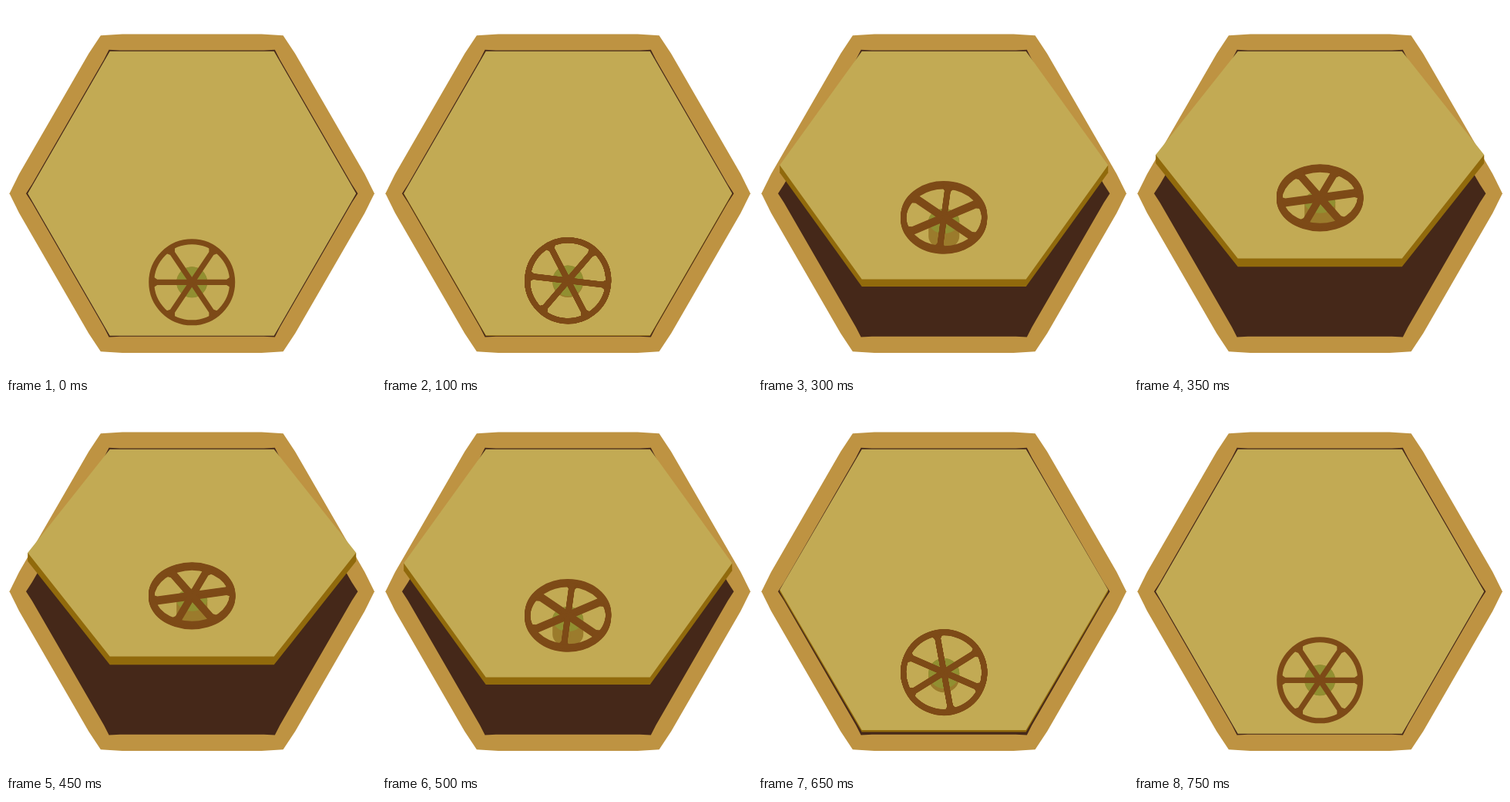
Recreate the animation shown at these times as an HTML page with a canvas. Size 480x480 px, loop 800 ms.

```html
<!DOCTYPE html>
<html lang="en">
<head>
<meta charset="utf-8">
<title>Hatch</title>
<style>
html, body { margin: 0; width: 100%; height: 100%; overflow: hidden; background: #fff; }
canvas { display: block; }
</style>
</head>
<body>
<canvas id="stage" width="480" height="480"></canvas>
<script>
const ctx = document.getElementById('stage').getContext('2d');
const RAD = Math.PI / 180;
const LOOP = 800, STEP = 50;
const OPEN = 45.8 * RAD, SPIN = 120 * RAD;
const LID_DEPTH = 16, HUB_HEIGHT = 33, WHEEL_HEIGHT = 41;
const CX = 241.2, CY = 243.2;
const COLOR = {
  frame: '#be9342', hole: '#452819', lid: '#c2aa54', edge: '#916a0c',
  hub: '#918f31', hubSide: '#9b7b2c', wheel: '#7d4a17'
};

// Repeats the points of one corner (the right one) around the hexagon.
function hexagon(corner) {
  const points = [];
  for (let k = 0; k < 6; k++) {
    const c = Math.cos(k * 60 * RAD), s = Math.sin(k * 60 * RAD);
    for (const [x, y] of corner) points.push([CX + x * c - y * s, CY + x * s + y * c]);
  }
  return points;
}

const rim = hexagon([[224.2, -25.2], [236.7, 0], [224.2, 25.2]]);
const hole = hexagon([[207.4, -12], [215.2, 0], [207.4, 12]]);
const lid = hexagon([[213, 0]]);
const HINGE = CY - 213 * Math.sin(60 * RAD);

function fillPath(points, color) {
  ctx.beginPath();
  points.forEach(([x, y]) => ctx.lineTo(x, y));
  ctx.closePath();
  ctx.fillStyle = color;
  ctx.fill();
}

function drawLid(cos, sin) {
  const face = lid.map(([x, y]) => [x, HINGE + (y - HINGE) * cos]);
  const drop = LID_DEPTH * sin;
  if (drop > 0) {
    const [right, lowRight, lowLeft, left] = face;
    const low = ([x, y]) => [x, y + drop];
    fillPath([left, right, low(right), low(lowRight), low(lowLeft), low(left)], COLOR.edge);
  }
  fillPath(face, COLOR.lid);
}

function drawHub(y, cos, sin) {
  const r = 20, top = y - HUB_HEIGHT * sin;
  ctx.fillStyle = COLOR.hubSide;
  ctx.beginPath();
  ctx.ellipse(CX, y, r, r * cos, 0, 0, Math.PI);
  ctx.ellipse(CX, top, r, r * cos, 0, Math.PI, 2 * Math.PI);
  ctx.fill();
  ctx.fillStyle = COLOR.hub;
  ctx.beginPath();
  ctx.ellipse(CX, top, r, r * cos, 0, 0, 2 * Math.PI);
  ctx.fill();
}

function drawWheelLayer(y, cos, turn) {
  ctx.save();
  ctx.translate(CX, y);
  ctx.scale(1, cos);
  ctx.rotate(turn);
  ctx.lineWidth = 7;
  ctx.beginPath();
  ctx.arc(0, 0, 52.5, 0, 2 * Math.PI);
  ctx.stroke();
  for (const angle of [0, 56, 124, 180, 236, 304]) {
    ctx.save();
    ctx.rotate(angle * RAD);
    // Spoke, flared where it meets the ring.
    fillPath([[0, -3.6], [45, -3.6], [50, -7], [50, 7], [45, 3.6], [0, 3.6]], COLOR.wheel);
    ctx.restore();
  }
  ctx.restore();
}

function drawWheel(y, cos, sin, turn) {
  ctx.strokeStyle = COLOR.wheel;
  const half = sin > 0 ? 4 : 0;
  for (let z = -half; z <= half; z++) {
    drawWheelLayer(y - (WHEEL_HEIGHT + z) * sin, cos, turn);
  }
}

function draw(time) {
  const step = Math.floor((time % LOOP) / STEP);
  const u = Math.max(0, step - 1) / 14;
  const x = 1 - Math.abs(2 * u - 1);
  const ease = x * x * (3 - 2 * x);
  const cos = Math.cos(OPEN * ease), sin = Math.sin(OPEN * ease);
  const center = HINGE + 299.6 * cos;

  ctx.fillStyle = '#fff';
  ctx.fillRect(0, 0, 480, 480);
  fillPath(rim, COLOR.frame);
  fillPath(hole, COLOR.hole);
  drawLid(cos, sin);
  drawHub(center, cos, sin);
  drawWheel(center, cos, sin, SPIN * ease);
}

function tick() {
  draw(performance.now());
  requestAnimationFrame(tick);
}
tick();
</script>
</body>
</html>
```
